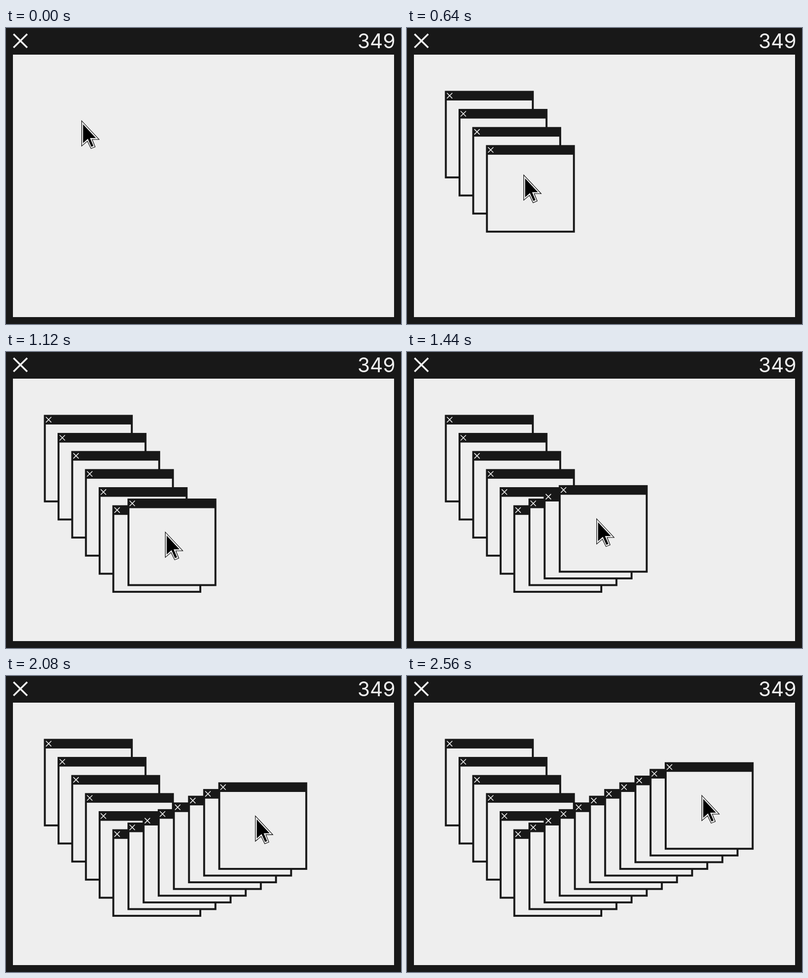
Write an HTML page that moves like this. It is 797 px wide and 600 px high and loops after 2720 ms.

```html
<!DOCTYPE html>
<html lang="en">
<head>
<meta charset="utf-8">
<title>Window trail</title>
<style>
  html, body { margin: 0; width: 100%; height: 100%; overflow: hidden; background: #181818; }
  svg { display: block; width: 797px; height: 600px; }
  text { font: 400 40.5px Inter, Arial, sans-serif; fill: #eee; text-anchor: end; }
</style>
</head>
<body>
<svg viewBox="0 0 797 600">
  <defs>
    <g id="window">
      <rect width="179.4" height="177.4" fill="#181818"/>
      <rect x="3.9" y="19.5" width="171.6" height="154" fill="#eee"/>
      <path d="M4.2 4.4l10.8 10.8M15 4.4L4.2 15.2" stroke="#eee" stroke-width="1.6"/>
    </g>
  </defs>
  <rect width="797" height="600" fill="#181818"/>
  <rect x="14" y="54" width="769" height="532" fill="#eee"/>
  <path d="M15.2 12.2l27.6 27.6M42.8 12.2L15.2 39.8" stroke="#eee" stroke-width="3.6"/>
  <text x="785.5" y="41">349</text>
  <g id="trail"></g>
  <g id="cursor">
    <path d="M0 0L35.3 38H21.2L27.3 53 18.9 56.4 11.7 41.4 0 51.3Z" fill="#eee" stroke="#000" stroke-width="1.1"/>
    <path d="M2.9 7.2L28.6 35H16.8L23.7 51 19.6 52.7 12.5 36.6 2.9 45.3Z"/>
  </g>
</svg>
<script>
  const STEP = 160, COUNT = 16, LOOP = STEP * (COUNT + 1);
  const TURN = 5;
  const trail = document.getElementById('trail');
  const cursor = document.getElementById('cursor');

  // Window index and cursor tip; in-between positions are linear.
  const cursorKeys = [
    [0, 152.6, 188], [5, 290.7, 371], [6, 321.4, 365],
    [10, 443.8, 311], [13, 532.8, 270], [15, 594.8, 242]
  ];

  function windowAt(i) {
    const down = Math.min(i, TURN), up = Math.max(i - TURN, 0);
    return [76.4 + 27.64 * down + 30.54 * up, 127.4 + 36.65 * down - 13.59 * up];
  }

  function cursorAt(i) {
    const next = Math.max(1, cursorKeys.findIndex(key => key[0] >= i));
    const [i0, x0, y0] = cursorKeys[next - 1];
    const [i1, x1, y1] = cursorKeys[next];
    const p = (i - i0) / (i1 - i0);
    return [x0 + (x1 - x0) * p, y0 + (y1 - y0) * p];
  }

  const place = (node, [x, y]) => node.setAttribute('transform', `translate(${x} ${y})`);

  const windows = Array.from({ length: COUNT }, (_, i) => {
    const node = document.createElementNS('http://www.w3.org/2000/svg', 'use');
    node.setAttribute('href', '#window');
    place(node, windowAt(i));
    trail.append(node);
    return node;
  });

  function draw(time) {
    const shown = Math.floor((time % LOOP) / STEP);
    windows.forEach((node, i) => {
      node.style.display = i < shown ? '' : 'none';
    });
    place(cursor, cursorAt(Math.max(0, shown - 1)));
  }

  let start;
  function tick(now) {
    start ??= now;
    draw(now - start);
    requestAnimationFrame(tick);
  }
  draw(0);
  requestAnimationFrame(tick);
</script>
</body>
</html>
```
